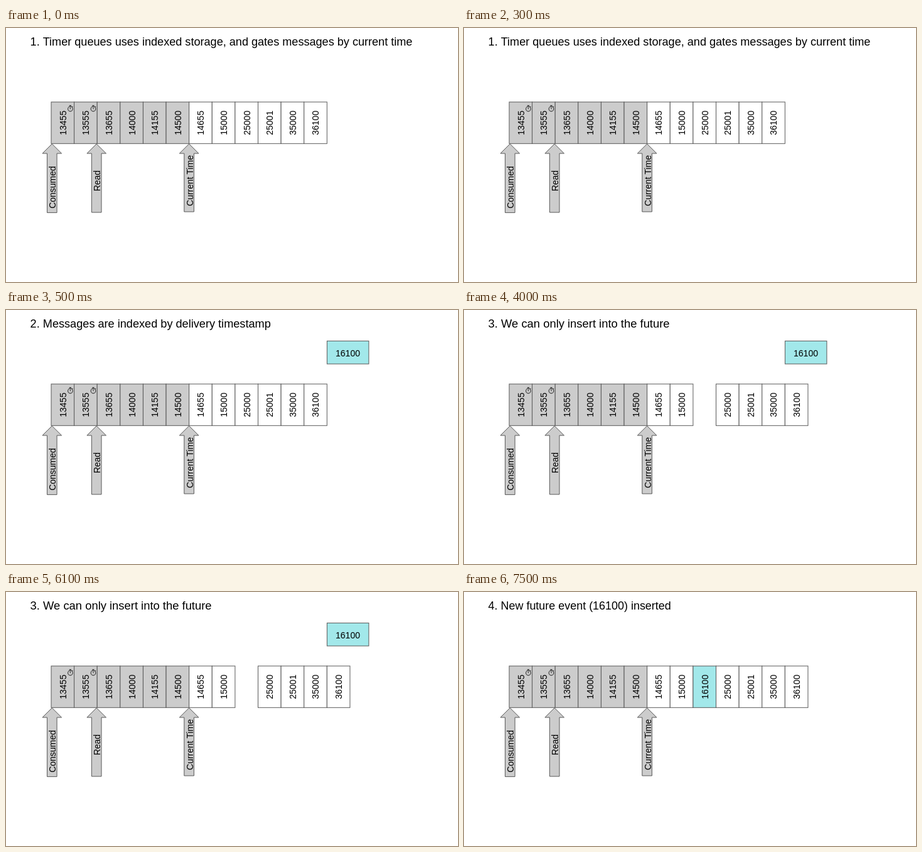
These frames come from a looping animation (720x405 px, 8000 ms). An HTML page with a canvas:

```html
<!DOCTYPE html>
<html lang="en">
<head>
<meta charset="utf-8">
<title>Timer queue</title>
<style>
  html, body { margin: 0; width: 100%; height: 100%; overflow: hidden; background: #fff; }
  canvas { display: block; width: 720px; height: 405px; }
</style>
</head>
<body>
<canvas id="stage" width="720" height="405"></canvas>
<script>
const ctx = document.getElementById('stage').getContext('2d');
const FONT = '"Liberation Sans", Arial, sans-serif';
const GREY = '#cccccc', BLUE = '#a2e8ea', LINE = '#595959';
const LOOP = 8000;
const LEFT = 72, TOP = 118, STEP = 36.61, CELL_H = 66.3;

const past = [13455, 13555, 13655, 14000, 14155, 14500];
const soon = [14655, 15000];
const later = [25000, 25001, 35000, 36100];
const added = 16100;

const steps = [
  { at: 0, size: 18.1, title: '1. Timer queues uses indexed storage, and gates messages by current time' },
  { at: 500, size: 18.15, title: '2. Messages are indexed by delivery timestamp', waiting: true },
  { at: 4000, size: 18.4, title: '3. We can only insert into the future', waiting: true, gap: true },
  { at: 7500, size: 17.95, title: '4. New future event (16100) inserted', gap: true, inserted: true }
];

const pointers = [
  { label: 'Consumed', x: 73.3, bottom: 294.4, mid: 254, base: 79 },
  { label: 'Read', x: 144.2, bottom: 294, mid: 243.6, base: 149.6 },
  { label: 'Current Time', x: 291.6, bottom: 293, mid: 243.4, base: 297.6 }
];

function text(str, x, y, size, align) {
  ctx.font = `${size}px ${FONT}`;
  ctx.textAlign = align;
  ctx.fillStyle = '#000';
  ctx.fillText(str, x, y);
}

function upright(str, base, mid) {
  ctx.save();
  ctx.translate(base, mid);
  ctx.rotate(-Math.PI / 2);
  text(str, 0, 0, 14, 'center');
  ctx.restore();
}

function box(x, y, w, h, fill) {
  ctx.fillStyle = fill;
  ctx.strokeStyle = LINE;
  ctx.lineWidth = 1;
  ctx.fillRect(x, y, w, h);
  ctx.strokeRect(x, y, w, h);
}

function cell(value, slot, fill) {
  const x = LEFT + slot * STEP;
  box(x, TOP, STEP, CELL_H, fill);
  upright(String(value), x + 23.7, 151.3);
}

function pointer({ label, x, bottom, mid, base }) {
  const tip = 184.8, neck = 200, half = 15.3, shaft = 7.8;
  ctx.beginPath();
  ctx.moveTo(x, tip);
  ctx.lineTo(x + half, neck);
  ctx.lineTo(x + shaft, neck);
  ctx.lineTo(x + shaft, bottom);
  ctx.lineTo(x - shaft, bottom);
  ctx.lineTo(x - shaft, neck);
  ctx.lineTo(x - half, neck);
  ctx.closePath();
  ctx.fillStyle = GREY;
  ctx.fill();
  ctx.strokeStyle = LINE;
  ctx.lineWidth = 1;
  ctx.stroke();
  upright(label, base, mid);
}

function stopwatch(x, y) {
  ctx.strokeStyle = '#3c3c3c';
  ctx.lineWidth = 1.2;
  ctx.beginPath();
  ctx.arc(x, y, 3.8, 0, Math.PI * 2);
  ctx.moveTo(x - 1.6, y - 5.3);
  ctx.lineTo(x + 1.6, y - 5.3);
  ctx.moveTo(x + 2.9, y - 4);
  ctx.lineTo(x + 4, y - 2.9);
  ctx.moveTo(x, y - 2.4);
  ctx.lineTo(x, y + 0.6);
  ctx.stroke();
}

function draw(t) {
  const step = steps.filter(s => s.at <= t).pop();
  ctx.fillStyle = '#fff';
  ctx.fillRect(0, 0, 720, 405);
  text(step.title, 38.6, 28, step.size, 'left');

  past.forEach((v, i) => cell(v, i, GREY));
  soon.forEach((v, i) => cell(v, i + 6, '#fff'));
  later.forEach((v, i) => cell(v, i + (step.gap ? 9 : 8), '#fff'));
  if (step.inserted) cell(added, 8, BLUE);
  if (step.waiting) {
    box(511.4, 49.4, 66.5, 36.6, BLUE);
    text(String(added), 544.5, 74, 14, 'center');
  }

  stopwatch(102.4, 129);
  stopwatch(139, 129);
  pointers.forEach(pointer);
}

const start = performance.now();
function tick() {
  draw((performance.now() - start) % LOOP);
  requestAnimationFrame(tick);
}
tick();
</script>
</body>
</html>
```
